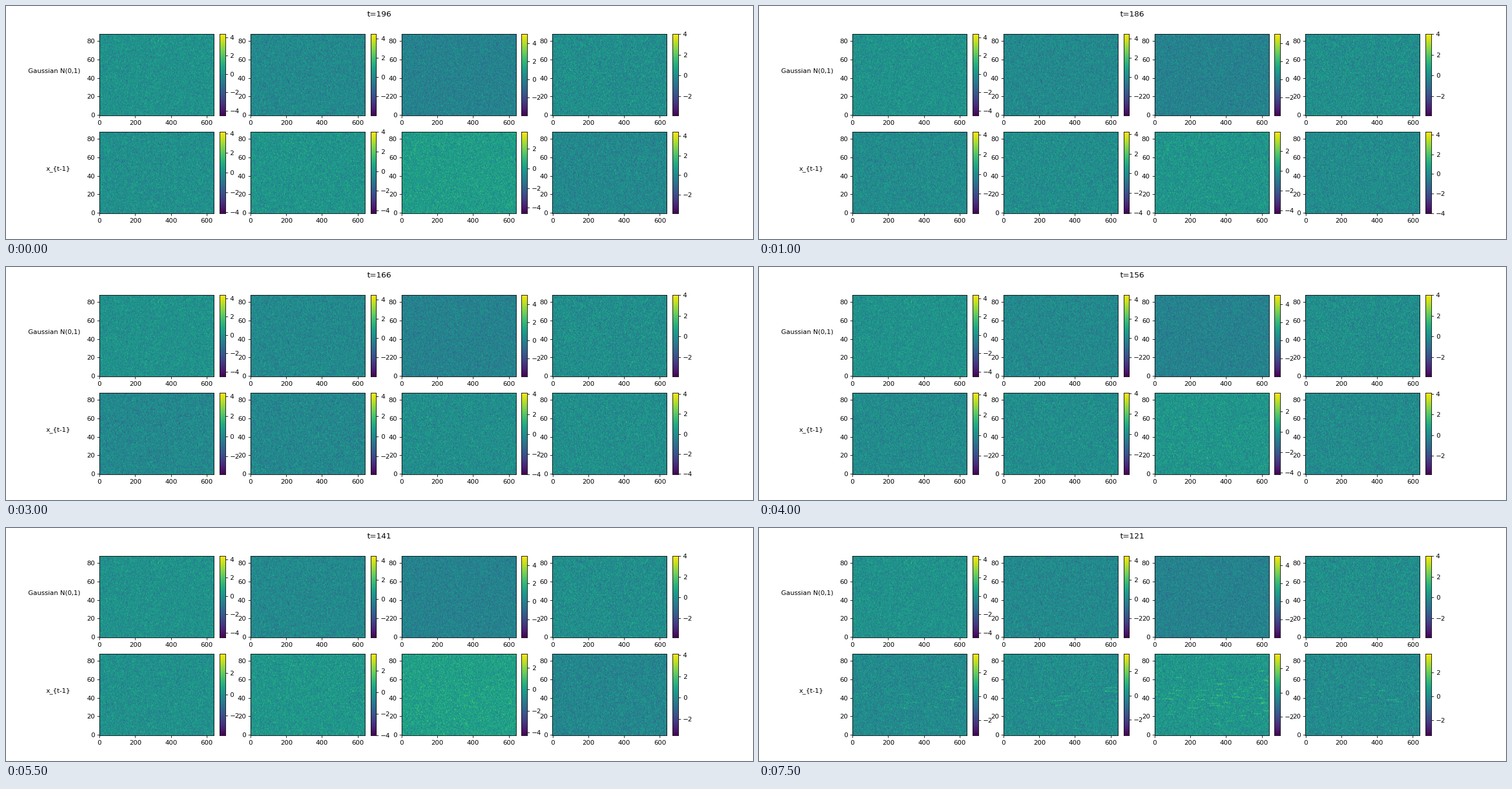
A matplotlib script for the animation above (8000 ms loop, 1280 by 400 pixels).

```python
import numpy as np
import matplotlib.pyplot as plt
from matplotlib.animation import FuncAnimation
from matplotlib.ticker import MultipleLocator

W, H, DPI = 1280, 400, 80
FRAMES, INTERVAL = 16, 500
ROWS, COLS = 88, 640
CELL = 992 / 4.6  # column width with 0.2 gaps, as in a default subplot grid
PANEL_W, PANEL_H = CELL / 1.1, 140
STEP_X, STEP_Y = 1.2 * CELL, 1.2 * PANEL_H
KEEP = 0.95  # share of the noise carried over from one step to the next

plt.rcParams.update({"font.family": "DejaVu Sans", "font.size": 10})
rng = np.random.default_rng(7)

# (vmin, vmax) of the four fixed panels
FIXED_LIMITS = [(-4.51, 4.38), (-3.99, 4.48), (-3.99, 5.03), (-3.87, 4.0)]
# (middle, swing) of the drifting colour range, and streak count, per panel
DRIFT = [(0.13, 0.16), (0.05, 0.26), (-0.2, 0.3), (0.16, -0.14)]
STREAKS = [10, 14, 50, 12]


def gauss():
    return rng.standard_normal((ROWS, COLS))


def noise_chain():
    """Gaussian fields that drift slowly from step to step."""
    chain = [gauss()]
    while len(chain) < FRAMES:
        chain.append(KEEP * chain[-1] + np.sqrt(1 - KEEP**2) * gauss())
    return chain


def streak_map(count):
    """Short horizontal lines scattered around the middle rows."""
    out = np.zeros((ROWS, COLS))
    for _ in range(count):
        y = int(np.clip(rng.normal(40, 11), 0, ROWS - 1))
        x = rng.integers(0, COLS)
        out[y, x:x + rng.integers(15, 60)] = 1
    return out


def limits(i, middle, swing):
    """Colour range: a slow sway of its middle while it narrows."""
    mid = middle + swing * np.cos(2 * np.pi * (i - 5) / 13)
    half = 4.15 - 0.75 * (i / (FRAMES - 1)) ** 2.5
    return mid - half, mid + half


class Panel:
    """Heat map with a slim colour scale at its right."""

    def __init__(self, row, col):
        x, y = 160 + col * STEP_X, 44 + (1 - row) * STEP_Y
        ax = fig.add_axes([x / W, y / H, PANEL_W / W, PANEL_H / H])
        self.im = ax.imshow(np.zeros((ROWS, COLS)), origin="lower",
                            aspect="auto", cmap="viridis")
        bar_x, bar_w = x + 1.05 * PANEL_W, 0.05 * PANEL_W
        self.scale = fig.add_axes([bar_x / W, y / H, bar_w / W, PANEL_H / H])
        self.ramp = self.scale.imshow(np.linspace(0, 1, 256)[:, None],
                                      origin="lower", aspect="auto",
                                      cmap="viridis", interpolation="nearest")
        self.scale.set_xticks([])
        self.scale.yaxis.tick_right()
        self.scale.yaxis.set_major_locator(MultipleLocator(2))

    def show(self, data, lo, hi):
        self.im.set_data(data)
        self.im.set_clim(lo, hi)
        self.ramp.set_extent((0, 1, lo, hi))
        self.scale.set_xlim(0, 1)
        self.scale.set_ylim(lo, hi)


fig = plt.figure(figsize=(W / DPI, H / DPI), dpi=DPI, facecolor="white")
title = fig.suptitle("t=196", fontsize=12)
for x, y, label in [(82.5, 117, "Gaussian N(0,1)"), (89.5, 285, "x_{t-1}")]:
    fig.text(x / W, 1 - y / H, label, ha="center", va="bottom")

for col, (lo, hi) in enumerate(FIXED_LIMITS):
    Panel(0, col).show(gauss(), lo, hi)

panels = [Panel(1, col) for col in range(4)]
chains = [noise_chain() for _ in panels]
streaks = [streak_map(count) for count in STREAKS]


def update(i):
    title.set_text(f"t={196 - 5 * i}")
    spread = np.interp(i, [6, 15], [1, 0.83])
    signal = 0.8 * np.clip((i - 6) / 9, 0, 1) ** 2
    for panel, chain, lines, drift in zip(panels, chains, streaks, DRIFT):
        panel.show(spread * chain[i] + signal * lines, *limits(i, *drift))
    return []


anim = FuncAnimation(fig, update, frames=FRAMES, interval=INTERVAL,
                     init_func=lambda: update(0), repeat=True, repeat_delay=0)
plt.show()
```
